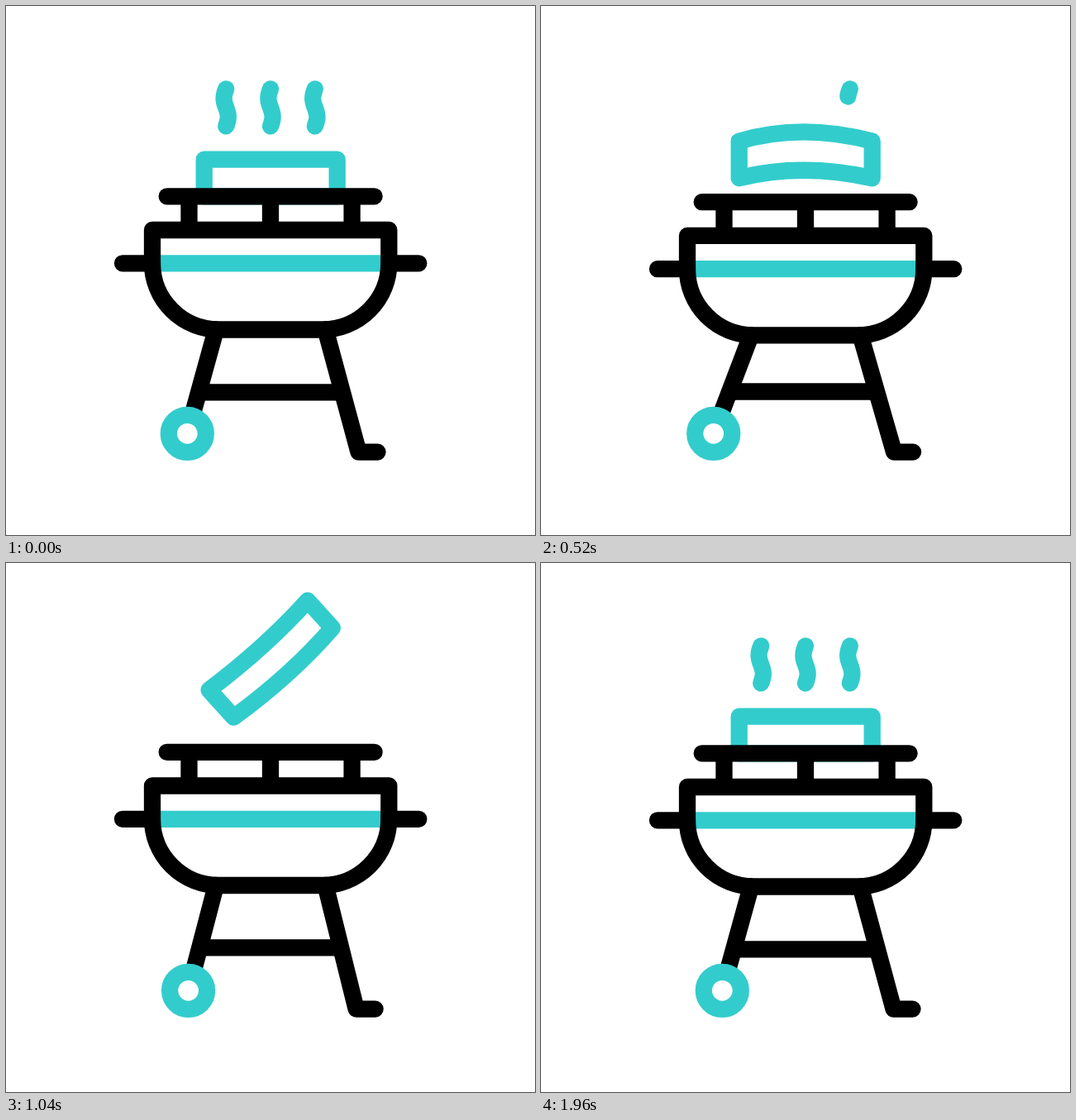
Animation, 640 px wide and 640 px high, one loop 2.16 s. Source, as an HTML page with a canvas:

```html
<!DOCTYPE html>
<html lang="en">
<head>
<meta charset="utf-8">
<title>Barbecue</title>
<style>
html, body { margin: 0; height: 100%; overflow: hidden; background: #fff; }
canvas { display: block; width: 100vmin; height: 100vmin; }
</style>
</head>
<body>
<canvas width="640" height="640"></canvas>
<script>
const ctx = document.querySelector('canvas').getContext('2d');
const LOOP = 2160, STEP = 40;
const BLACK = '#000', TEAL = '#33cccc';

const clamp = x => Math.min(1, Math.max(0, x));
const smooth = x => (x = clamp(x), x * x * (3 - 2 * x));
const easeOut = x => 1 - (1 - clamp(x)) ** 3;

// Eased value of a [time, value] track
function track(t, keys) {
  let [t0, v0] = keys[0];
  for (const [t1, v1] of keys) {
    if (t < t1) return v0 + (v1 - v0) * smooth((t - t0) / (t1 - t0));
    [t0, v0] = [t1, v1];
  }
  return v0;
}

const dip = t => track(t, [[0, 0], [360, 12], [840, -7.6], [1120, 0]]);
const wheelShift = t => track(t, [[0, 0], [370, -16], [840, 6.6], [1120, 0]]);
const footShift = t => track(t, [[0, 0], [320, 8], [840, -14.5], [1120, 0]]);
const braceShift = t => track(t, [[0, 0], [290, 5], [840, -10.6], [1120, 0]]);
const steakBend = t => track(t, [[440, 0], [540, -12.5], [840, 0], [1240, -9], [1540, 0]]);

function stroke(color, path, cap = 'round') {
  ctx.strokeStyle = color;
  ctx.lineCap = cap;
  ctx.stroke(new Path2D(path));
}

function drawSteam(t) {
  for (let i = 0; i < 3; i++) {
    const gone = smooth((t - 40 - 112 * i) / 360);
    const back = easeOut((t - 1350 - 107 * i) / 400);
    const [from, to] = t < 1000 ? [0, 1 - gone] : [1 - back, 1];
    if (to - from < 0.001) continue;
    const points = [];
    for (let k = 0; k <= 30; k++) {
      const u = from + (to - from) * k / 30;
      points.push([266.2 + 53.8 * i - 2.6 * Math.sin(2 * Math.PI * u), 100.4 + 45 * u]);
    }
    stroke(TEAL, 'M' + points.join('L'));
  }
}

function drawSteak(t, sink) {
  const top = 106.7, rest = 208, w = 80.5, h = 22.3;
  const y = t < 840
    ? Math.min(rest + sink, top + 0.000774 * (t - 840) ** 2)
    : Math.min(rest, top + 0.000234 * (t - 840) ** 2);
  const bend = 2 * steakBend(t);
  ctx.save();
  ctx.translate(320.2, y);
  ctx.rotate(Math.PI * smooth((t - 560) / 700));
  stroke(TEAL, `M${-w} ${-h}Q-5 ${bend - h} ${w} ${-h}V${h}Q-5 ${bend * 0.85 + h} ${-w} ${h}Z`);
  ctx.restore();
}

function drawLegs(t, sink) {
  const top = 391.5 + sink, brace = 467.4 + braceShift(t);
  const wheel = 219.3 + wheelShift(t), foot = 426.5 + footShift(t);
  const along = (x0, x1, y1) => x0 + (x1 - x0) * (brace - top) / (y1 - top);
  stroke(BLACK, `M254 ${top}L${wheel} 517.3`);
  stroke(BLACK, `M386.5 ${top}L${foot} 539.6h23`);
  stroke(BLACK, `M${along(254, wheel, 517.3)} ${brace}H${along(386.5, foot, 539.6)}`, 'butt');
  ctx.beginPath();
  ctx.arc(wheel, 517.3, 22.5, 0, 2 * Math.PI);
  ctx.fillStyle = '#fff';
  ctx.fill();
  ctx.strokeStyle = TEAL;
  ctx.stroke();
}

function drawGrill(sink) {
  ctx.save();
  ctx.translate(0, sink);
  stroke(TEAL, 'M180 311.3H460', 'butt');
  stroke(BLACK, 'M194.7 230.3H445.6M141 311.3H177M463.3 311.3H499.3');
  stroke(BLACK, 'M221.5 230V271M320 230V271M418.6 230V271', 'butt');
  stroke(BLACK, 'M177 271H463.3V311A80.5 80.5 0 0 1 382.8 391.5H257.5A80.5 80.5 0 0 1 177 311Z');
  ctx.restore();
}

function draw(now) {
  const t = Math.floor(now % LOOP / STEP) * STEP;
  const sink = dip(t);
  ctx.clearRect(0, 0, 640, 640);
  ctx.lineWidth = 20.3;
  ctx.lineJoin = 'round';
  drawSteam(t);
  drawSteak(t, sink);
  drawLegs(t, sink);
  drawGrill(sink);
}

const start = performance.now();
function loop() {
  draw(performance.now() - start);
  requestAnimationFrame(loop);
}
loop();
</script>
</body>
</html>
```
